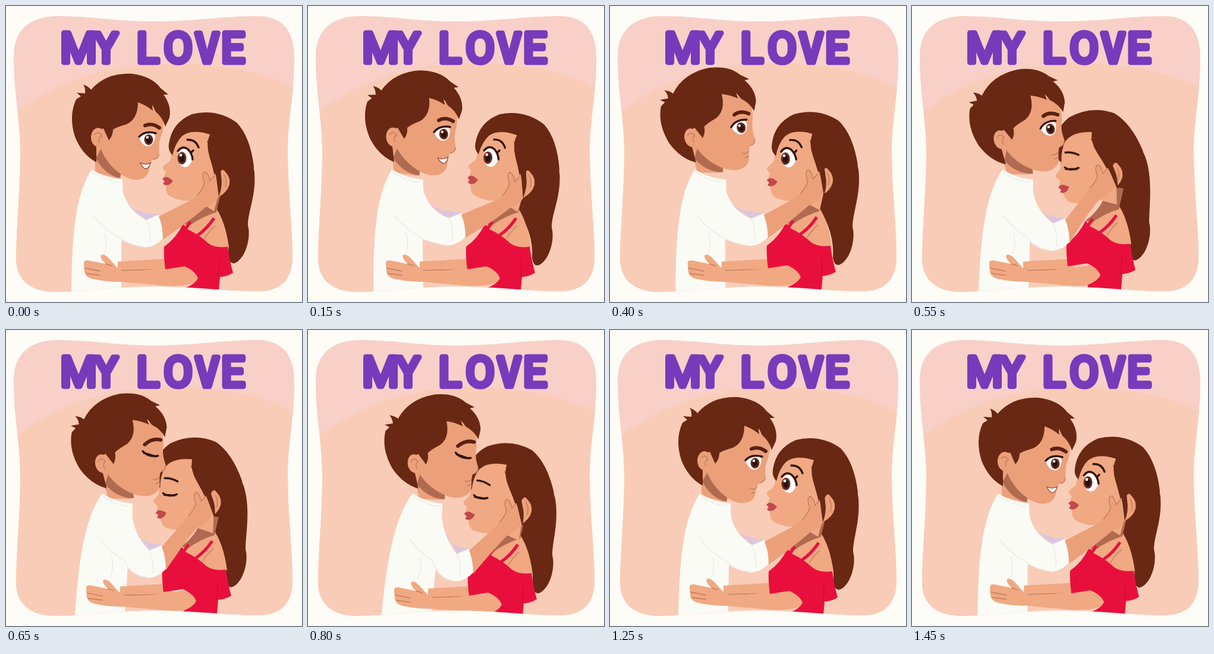
Write an HTML page that moves like this. It is 498x498 px and loops after 1500 ms.

```html
<!DOCTYPE html>
<html lang="en">
<head>
<meta charset="utf-8">
<title>My Love</title>
<style>
  html, body { margin: 0; width: 100%; height: 100%; overflow: hidden; background: #fdfcf6; }
  svg { display: block; width: 498px; height: 498px; }
  .title { font: 400 70px Roboto, sans-serif; fill: #773abb; stroke: #773abb; stroke-width: 8.5;
    stroke-linejoin: round; text-anchor: middle; }
  .mono { font-family: "DejaVu Sans Mono", monospace; font-size: 67px; }
  .hair { fill: #692813; }
  .skin { fill: #eba07a; }
  .fair { fill: #f0a982; }
  .shade { fill: #b06a50; }
  .red { fill: #e90f3c; }
  .shirt { fill: #fbfbf6; }
  .line { fill: none; stroke: #33150f; stroke-width: 3.4; stroke-linecap: round; stroke-linejoin: round; }
  .brow { fill: none; stroke: #5a2110; stroke-width: 6; stroke-linecap: round; }
  .crease { fill: none; stroke: #c27b5a; stroke-width: 1.4; stroke-linecap: round; }
  .fold { fill: none; stroke: #ece7e6; stroke-width: 1.3; stroke-linecap: round; }
</style>
</head>
<body>
<svg viewBox="0 0 498 498">
  <defs>
    <clipPath id="clip">
      <path d="M13,85C13,40 40,18 85,17C150,17 180,26 250,26C320,26 360,17 425,17C468,18 486,45 485,90C485,150 474,190 474,245C474,310 482,370 482,425C481,460 462,480 425,480C370,480 320,472 250,472C180,472 130,481 80,481C40,480 17,460 17,425C18,360 24,310 24,245C24,190 13,150 13,85Z"/>
    </clipPath>
  </defs>
  <g clip-path="url(#clip)">
    <rect width="498" height="498" fill="#f8d0c8"/>
    <path d="M0,192Q60,143 130,119Q250,80 400,108Q450,118 498,145V498H0Z" fill="#f9ccb7"/>
    <text class="title" x="122 168.5 205 238.5 289.5 338.5 382" y="95">M<tspan class="mono">Y</tspan> LO<tspan class="mono">V</tspan>E</text>

    <path id="tail" class="hair"/>

    <g id="neck">
      <path class="skin" d="M150,225L150,280L188,290L195,262Z"/>
      <path class="shade" d="M160,240Q172,268 194,281L192,290Q166,284 151,256Z"/>
    </g>
    <g id="torso">
      <path class="shirt" d="M144,275Q168,290 196,292L197,330L194,400V490H110Q110,400 118,352Q125,305 144,275Z"/>
      <path class="fold" d="M146,280Q170,296 194,297M165,418Q172,400 166,382"/>
    </g>

    <g id="arms">
      <path class="fair" d="M188,430L275,425V445H188Z"/>
      <path class="crease" d="M194,445L268,443"/>
      <path class="fair" d="M193,446Q240,446 300,436Q332,446 324,462Q308,472 270,471L193,464Q168,464 150,460Q135,458 132,448L131,434Q130,427 138,428L168,434Q157,424 160,419Q166,415 178,430Q184,437 193,446Z"/>
      <path class="crease" d="M133,441L158,446M135,450L158,453M168,434L178,437"/>
    </g>

    <g id="dress">
      <path class="fair" d="M302,362L350,335Q369,360 375,406Q350,414 325,402L298,384Z"/>
      <path class="shade" d="M298,366Q328,345 340,300L362,312L354,347Q330,354 308,370Z"/>
      <path class="red" d="M298,366Q287,390 266,405Q265,420 268,443L300,438Q318,445 323,458Q318,468 302,474L300,490H357L360,456Q372,455 382,449Q377,432 373,405Q352,408 340,399Q324,384 306,376Z"/>
      <path d="M300,378L310,363M322,386Q338,375 350,357" fill="none" stroke="#e90f3c" stroke-width="5"/>
      <path d="M357,456Q361,440 358,425" fill="none" stroke="#c50d35" stroke-width="1.3"/>
      <path class="crease" d="M334,391Q342,378 352,370"/>
    </g>

    <g id="woman">
      <path class="fair" d="M278,246Q278,258 274,262L264,270Q264,276 269,279L265,290L269,302Q268,318 280,322Q300,331 318,326L350,345L362,300L350,205H295Z"/>
      <path d="M277,291Q269,284 263,291L267,295L264,299Q269,304 277,299L281,294Z" fill="#c4474c"/>
      <g id="womanOpen">
        <ellipse cx="301" cy="255" rx="12" ry="16" fill="#fff"/>
        <ellipse cx="296" cy="256" rx="7.5" ry="10.5" fill="#6a2c1d"/>
        <ellipse cx="296" cy="256" rx="4.5" ry="7" fill="#2a1110"/>
        <circle cx="294" cy="251" r="2.4" fill="#fff"/>
        <path class="line" d="M289,244Q297,234 306,241Q313,248 314,258M311,247L315,243"/>
        <path class="line" d="M305,225Q319,224 324,238"/>
      </g>
      <g id="womanShut">
        <path class="line" d="M283,261Q290,270 305,268M284,264L301,269"/>
        <path class="line" d="M291,237Q302,239 311,247"/>
      </g>
      <path class="hair" d="M280,251Q272,243 274,232Q279,196 313,182Q354,172 388,196Q411,220 417,270L402,335L358,318Q352,285 342,252Q336,232 343,216Q312,206 296,219Q285,230 280,251Z"/>
    </g>

    <path id="cuffShade" fill="#dcc6de"/>
    <path id="sleeve" class="shirt"/>
    <path id="sleeveFold" class="fold"/>

    <g id="man">
      <path class="skin" d="M160,205L222,155L266,185Q266,208 260,222Q256,232 258,250Q257,258 246,259L243,266L241,274Q240,284 232,289Q218,297 198,286Q172,270 160,242Z"/>
      <path class="crease" d="M257,250Q256,257 248,258"/>
      <path class="hair" d="M152,263Q128,250 116,220Q105,185 118,157L126,152L119,146L133,147Q134,138 130,132Q140,136 143,141Q168,112 212,114Q245,118 260,138L273,149L265,149Q279,168 275,188L268,203Q264,188 252,178L246,166L247,176Q234,166 222,162Q222,190 203,199Q185,204 180,208Q180,218 173,226L164,206L150,210L152,240Z"/>
      <ellipse class="skin" cx="155" cy="221" rx="12" ry="16"/>
      <path class="crease" d="M149,216Q157,209 161,219Q154,221 157,230"/>
      <g id="manOpen">
        <path d="M224,221Q231,211 247,212L251,219Q249,236 238,236Q229,235 224,221Z" fill="#fff"/>
        <ellipse cx="240" cy="225" rx="7.5" ry="9" fill="#6a2c1d"/>
        <ellipse cx="240" cy="225" rx="4.5" ry="6" fill="#2a1110"/>
        <circle cx="238" cy="221" r="2.2" fill="#fff"/>
        <path class="line" d="M224,220Q234,209 252,214"/>
        <path class="brow" d="M234,201Q246,196 258,205"/>
      </g>
      <g id="manShut">
        <path class="line" d="M226,217Q232,229 249,231M227,220L245,231"/>
        <path class="brow" d="M232,207Q247,199 260,206"/>
      </g>
      <path id="smile" d="M226,264Q235,268 243,264Q241,273 235,274Q229,272 226,264Z" fill="#fff" stroke="#a5533f" stroke-width="1.5"/>
      <path id="lips" class="crease" d="M231,267Q237,271 243,266M234,276L240,274"/>
    </g>

    <path id="forearm" class="skin"/>
    <g id="hand">
      <path class="skin" d="M314,327Q331,308 334,298Q328,281 335,279Q341,282 343,294L350,286Q354,276 358,284Q364,270 369,279Q378,288 376,300Q372,314 358,321Q350,334 336,338Z"/>
      <path class="crease" d="M334,298Q328,281 335,279Q341,282 343,294L350,286M334,298Q331,308 322,318M367,284Q372,293 369,304"/>
    </g>
    <path id="strand" class="hair" d="M338,226Q349,262 354,290L358,321Q365,303 362,286L358,245Z"/>
  </g>
</svg>
<script>
const LOOP = 1500, STEP = 50;
const times = [0, 300, 550, 800, 1000, 1250];

// Values of each moving joint at the key times.
const keys = {
  manX: [155, 134, 150, 180, 186, 159],
  manY: [222, 221, 226, 226, 225, 221],
  manR: [0, -13, -15, -12, -11, 0],
  womanX: [270, 280, 254, 270, 272, 270],
  womanY: [295, 292, 308, 313, 315, 298],
  womanR: [0, 5, -16, -6, -5, 0],
  hem: [0, 0, 2, 14, 17, 5],
  collar: [0, -4, 8, 31, 36, 7],
  cuffX: [0, 2, 1, 14, 17, 3],
  cuffY: [0, -5, 6, 17, 19, 2],
  handX: [0, 10, -22, 0, 2, 2],
  handY: [0, 2, -12, 6, 7, 1],
  armX: [0, 0, -1, 14, 16, 3],
  armY: [0, 0, 0, 5, 6, 0],
  dressX: [0, 0, -6, 3, 4, 1],
  dressY: [0, 0, -5, 4, 5, 1],
  tailX: [380, 386, 372, 384, 385, 382],
  tailY: [433, 440, 428, 443, 446, 437]
};

const $ = id => document.getElementById(id);
const wrap = i => (i + times.length) % times.length;
const timeAt = i => times[wrap(i)] + LOOP * Math.floor(i / times.length);

// Cyclic cubic that rests at turning points and never overshoots.
function slope(v, i) {
  const rate = j => (v[wrap(j + 1)] - v[wrap(j)]) / (timeAt(j + 1) - timeAt(j));
  const a = rate(i - 1), b = rate(i);
  return a * b <= 0 ? 0 : 2 * a * b / (a + b);
}
function sample(v, t) {
  let i = times.length - 1;
  while (times[i] > t) i--;
  const span = timeAt(i + 1) - times[i], u = (t - times[i]) / span;
  const a = v[i], b = v[wrap(i + 1)];
  const ease = u * u * (3 - 2 * u);
  return a + (b - a) * ease
    + span * u * (1 - u) * ((1 - u) * slope(v, i) - u * slope(v, wrap(i + 1)));
}

const fmt = (x, y) => `${x.toFixed(2)},${y.toFixed(2)}`;
const shift = (dx, dy) => (x, y) => fmt(x + dx, y + dy);
function turn(px, py, x0, y0, deg) {
  const c = Math.cos(deg * Math.PI / 180), s = Math.sin(deg * Math.PI / 180);
  return (x, y) => fmt(x0 + (x - px) * c - (y - py) * s, y0 + (x - px) * s + (y - py) * c);
}
const place = (id, value) => $(id).setAttribute('transform', value);
const trace = (id, d) => $(id).setAttribute('d', d);
const show = (id, on) => { $(id).style.display = on ? '' : 'none'; };

function draw(t) {
  const p = {};
  for (const k in keys) p[k] = sample(keys[k], t);

  const man = `translate(${p.manX} ${p.manY}) rotate(${p.manR}) translate(-155 -222)`;
  const woman = `translate(${p.womanX} ${p.womanY}) rotate(${p.womanR}) translate(-270 -295)`;
  const lean = (p.collar - p.hem) / 190;
  place('man', man);
  place('neck', man);
  place('woman', woman);
  place('strand', woman);
  place('torso', `matrix(1 0 ${-lean} 1 ${p.hem + lean * 475} 0)`);
  place('arms', `translate(${p.armX} ${p.armY})`);
  place('dress', `translate(${p.dressX} ${p.dressY})`);
  place('hand', `translate(${p.handX} ${p.handY})`);

  const S = (x, y) => fmt(x + p.hem + lean * (475 - y), y);
  const C = shift(p.cuffX, p.cuffY);
  const H = shift(p.handX, p.handY);
  const T = shift(p.tailX, p.tailY);
  const W = turn(270, 295, p.womanX, p.womanY, p.womanR);

  trace('tail', `M${W(345, 215)}L${W(348, 340)}Q${T(-3, -55)} ${T(-6, -12)}Q${T(-4, 1)} ${T(4, 0)}`
    + `C${T(22, -6)} ${T(33, -42)} ${T(27, -64)}C${T(27, -88)} ${W(421, 320)} ${W(418, 280)}`
    + `Q${W(410, 220)} ${W(370, 190)}Z`);
  trace('cuffShade', `M${S(197, 328)}Q${C(220, 350)} ${C(258, 350)}L${C(240, 364)}Z`);
  trace('sleeve', `M${S(194, 293)}Q${S(196, 340)} ${C(236, 360)}L${C(257, 351)}Q${C(264, 370)} ${C(264, 391)}`
    + `Q${C(250, 406)} ${C(232, 406)}Q${C(205, 402)} ${S(185, 388)}L${S(150, 330)}Z`);
  trace('sleeveFold', `M${S(146, 352)}Q${S(166, 376)} ${S(188, 388)}Q${C(205, 402)} ${C(232, 405)}M${C(236, 360)}Q${C(244, 376)} ${C(242, 398)}`);
  trace('forearm', `M${C(257, 354)}L${H(318, 323)}L${H(344, 331)}Q${H(322, 352)} ${C(264, 393)}Q${C(264, 370)} ${C(257, 354)}Z`);

  const womanShut = t >= 450 && t < 1100, manShut = t >= 600 && t < 1100;
  const smiling = t < 400 || t >= 1350;
  show('womanOpen', !womanShut);
  show('womanShut', womanShut);
  show('manOpen', !manShut);
  show('manShut', manShut);
  show('smile', smiling);
  show('lips', !smiling);
}

const start = performance.now();
function tick() {
  const t = (performance.now() - start) % LOOP;
  draw(Math.floor(t / STEP) * STEP);
  requestAnimationFrame(tick);
}
tick();
</script>
</body>
</html>
```
